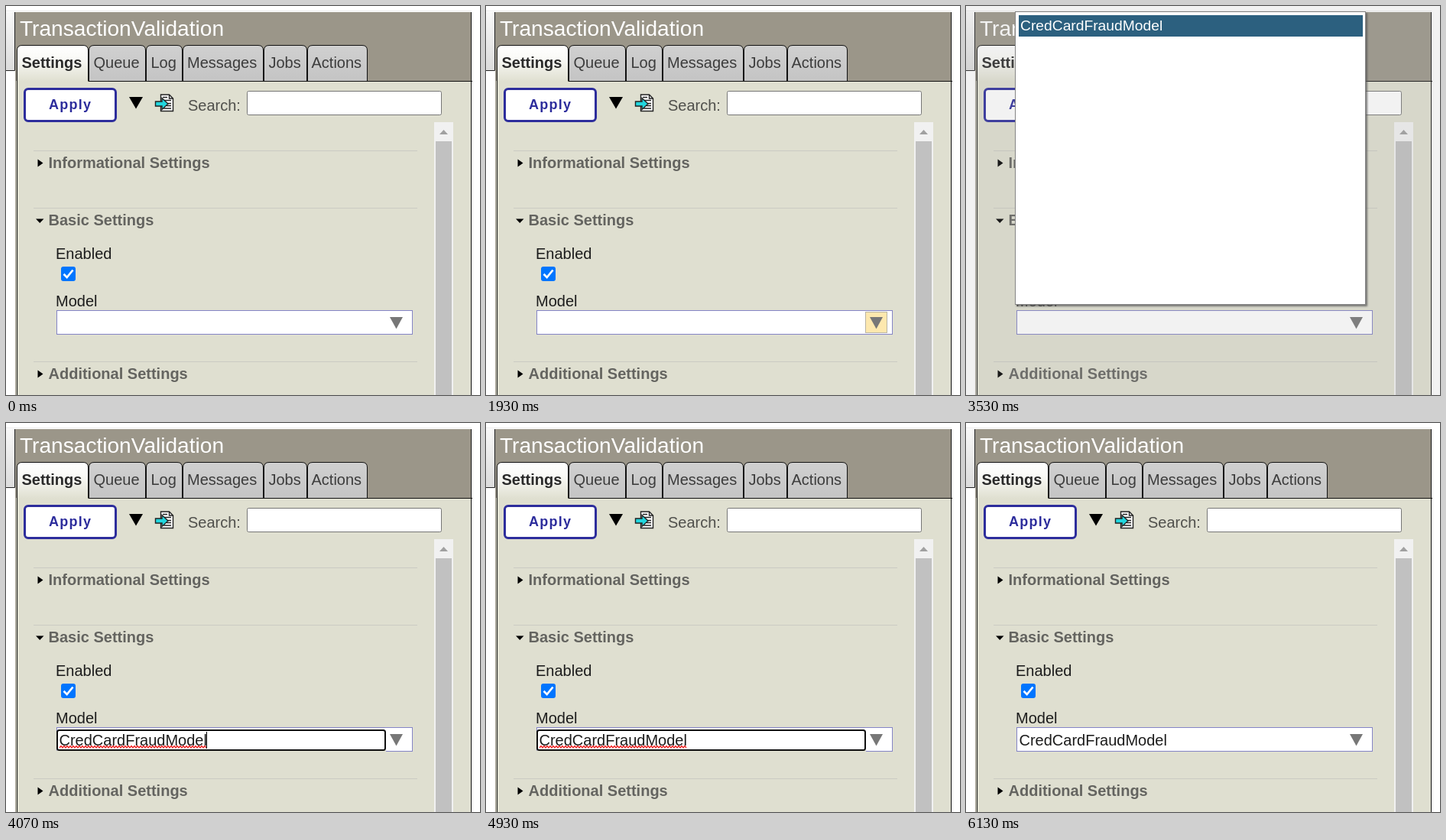
An HTML page for the animation above (6190 ms loop, 620 by 509 pixels).

```html
<!DOCTYPE html>
<html lang="en">
<head>
<meta charset="utf-8">
<title>Settings panel</title>
<style>
  html, body { margin: 0; width: 100%; height: 100%; overflow: hidden; background: #fff; }
  svg { display: block; width: 620px; height: 509px; }
  text { font: 20px "Liberation Sans", Arial, sans-serif; fill: #1c1c1c; white-space: pre; }
  .title { font-size: 28.1px; fill: #fff; }
  .tab { fill: #3c3c3c; }
  .active { font-weight: bold; fill: #2a2a2a; }
  .head { font-weight: bold; fill: #646460; }
  .apply { font-size: 18px; font-weight: bold; letter-spacing: 1.25px; fill: #2d2d9c; }
  .search { fill: #50504c; }
  .option { font-size: 19.25px; fill: #444; }
  .rule { stroke: #cbcbc3; }
</style>
</head>
<body>
<svg viewBox="0 0 620 509">
  <defs>
    <linearGradient id="side" x2="0" y2="1"><stop stop-color="#f8f8f8"/><stop offset="1" stop-color="#dcdcdc"/></linearGradient>
    <linearGradient id="active" x2="0" y2="1"><stop stop-color="#fff"/><stop offset=".35" stop-color="#fafaf7"/><stop offset="1" stop-color="#dfdfd0"/></linearGradient>
    <linearGradient id="idle" x2="0" y2="1"><stop stop-color="#d0d0d0"/><stop offset="1" stop-color="#c4c4c4"/></linearGradient>
    <filter id="shadow" x="-5%" y="-5%" width="110%" height="110%"><feDropShadow dx="2" dy="2" stdDeviation="1.3" flood-color="#555" flood-opacity=".75"/></filter>
  </defs>

  <!-- Panel -->
  <rect width="620" height="509" fill="#fff"/>
  <path d="M0 6.5H609" stroke="#ececec"/>
  <rect y="8" width="11" height="76" fill="url(#side)"/>
  <path d="M0 84.5H11.5V8" fill="none" stroke="#222"/>
  <rect x="12" y="8" width="597" height="91" fill="#9b9689"/>
  <rect x="12" y="98" width="597" height="411" fill="#dfdfd0"/>
  <path d="M12.5 8V509" stroke="#98948a"/>
  <path d="M14.5 98V509M608.5 8V509M108 98.5H610" stroke="#111"/>
  <text class="title" x="18" y="39">TransactionValidation</text>
  <g id="tabs"></g>

  <!-- Toolbar -->
  <rect x="24.5" y="108.5" width="119" height="42" rx="4.5" fill="#fff" stroke="#2d2d9c" stroke-width="3"/>
  <text class="apply" x="56" y="135">Apply</text>
  <path d="M161 119H179L170 134.5Z" fill="#000"/>
  <g stroke="#222" stroke-width="1.4">
    <path d="M202.5 116H213.500L218.500 121V137.500H202.500Z" fill="#fff"/>
    <path d="M213.500 116V121H218.500M205 119.500H211M206 123.500H216M210 127.500H216M210 130.500H216M206 134H216" fill="none"/>
    <path d="M195.500 125H204V120.500L212 128L204 135.500V131H195.500Z" fill="#22d6de"/>
  </g>
  <text class="search" x="238" y="137">Search:</text>
  <rect x="315.5" y="111.500" width="254" height="31" rx="2" fill="#fff" stroke="#767676"/>

  <!-- Sections -->
  <path class="rule" d="M36 189.500H538M36 264.500H538M36 465.500H538"/>
  <path d="M41.500 200.500L48.500 205.500L41.500 210.500ZM39 278.500H49.500L44.200 284ZM41.500 476.500L48.500 481.500L41.500 486.500Z" fill="#000"/>
  <text class="head" x="55.500" y="212">Informational Settings</text>
  <text class="head" x="55.500" y="287">Basic Settings</text>
  <text class="head" x="55.500" y="488">Additional Settings</text>
  <text x="65" y="331">Enabled</text>
  <rect x="72" y="341" width="19" height="19" rx="3" fill="#0075ff"/>
  <path d="M75.500 350.800L79.700 355L87.500 345.500" fill="none" stroke="#fff" stroke-width="2.700"/>
  <text x="65" y="393">Model</text>

  <!-- Scrollbar -->
  <rect x="560" y="152" width="25" height="357" fill="#f1f1f1"/>
  <path d="M567 168L572.500 162L578 168Z" fill="#a0a0a0"/>
  <rect id="thumb" x="562" y="177" width="21" height="332"/>

  <!-- Model field -->
  <rect x="66.500" y="398.500" width="465" height="31" fill="#fff" stroke="#8484c6"/>
  <rect id="hot" x="496.500" y="400.500" width="28" height="27" fill="#fde8ae" stroke="#b9b4a4"/>
  <path d="M502 407H519L510.500 422.500Z" fill="#777"/>
  <g id="focus">
    <path d="M66 429.500H497" stroke="#dfdfd0" stroke-width="2"/>
    <rect x="67" y="402" width="429" height="26" rx="2.500" fill="#fff" stroke="#101010" stroke-width="2"/>
    <path id="squiggle" fill="none" stroke="#f02020" stroke-width="1.300"/>
  </g>
  <text id="value" x="69.500" y="422">CredCardFraudModel</text>
  <rect id="caret" x="262" y="404" width="1" height="22" fill="#000"/>

  <!-- Option list -->
  <g id="popup">
    <rect width="620" height="509" fill="#aaa" opacity=".15"/>
    <rect x="64.500" y="7.500" width="458" height="383" fill="#fff" stroke="#858585" filter="url(#shadow)"/>
    <rect id="pick" x="69" y="12" width="450" height="28" fill="#2c607f"/>
    <text id="option" class="option" x="71" y="32">CredCardFraudModel</text>
  </g>
</svg>
<script>
  const $ = id => document.getElementById(id);
  const LOOP = 6190;

  // [left, right, text x, label]
  const tabs = [
    [14, 108, 20.5, 'Settings'], [108, 183, 114.5, 'Queue'], [183, 231, 189.5, 'Log'],
    [231, 337, 237, 'Messages'], [337, 394, 343.5, 'Jobs'], [394, 473, 399.5, 'Actions']
  ];
  $('tabs').innerHTML = tabs.map(([l, r, x, label], i) => `
    <path d="M${l + .5} ${i ? 98.5 : 99}V58q0-6.500 6.500-6.500H${r - 7}q6.500 0 6.500 6.500V98.500"
      fill="url(#${i ? 'idle' : 'active'})" stroke="#111"/>
    <text class="${i ? 'tab' : 'active'}" x="${x}" y="81">${label}</text>`).join('')
    + '<path d="M108 98.500H473" stroke="#111"/>';

  let wave = 'M70 425';
  for (let x = 72, up = true; x <= 263; x += 2, up = !up) wave += `L${x} ${up ? 422.5 : 425}`;
  $('squiggle').setAttribute('d', wave);

  // Start time and the parts that are on from then.
  const steps = [
    [0, ''], [1070, 'thumb'], [1400, ''], [1930, 'hot'],
    [2400, 'popup'], [3530, 'popup pick'],
    [4070, 'value focus caret'], [4600, 'value focus'],
    [5130, 'value focus caret'], [5670, 'value focus'], [6130, 'value']
  ];
  const parts = ['hot', 'popup', 'pick', 'value', 'focus', 'caret'];
  let shown = null;

  function draw(now) {
    const t = now % LOOP;
    const step = steps.findLast(s => s[0] <= t);
    if (step !== shown) {
      shown = step;
      const on = step[1].split(' ');
      for (const id of parts) $(id).style.display = on.includes(id) ? '' : 'none';
      $('thumb').setAttribute('fill', on.includes('thumb') ? '#a8a8a8' : '#c1c1c1');
      $('option').style.fill = on.includes('pick') ? '#fff' : '';
    }
  }

  const start = performance.now();
  function tick() {
    draw(performance.now() - start);
    requestAnimationFrame(tick);
  }
  tick();
</script>
</body>
</html>
```
